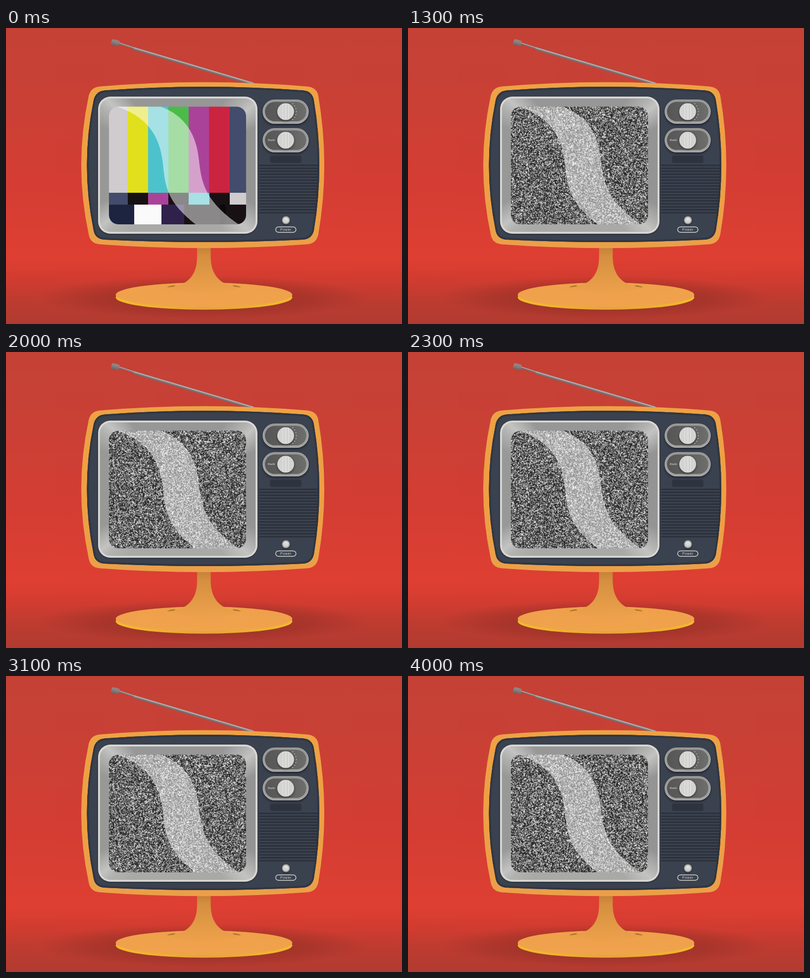
These frames come from a looping animation (800 by 600 pixels, 4.1 s). An HTML page with a canvas:

```html
<!DOCTYPE html>
<html lang="en">
<head>
<meta charset="utf-8">
<title>Retro television</title>
<style>
html, body { margin: 0; width: 100%; height: 100%; overflow: hidden; background: #c94035; }
canvas { display: block; width: 800px; height: 600px; }
</style>
</head>
<body>
<canvas id="stage" width="800" height="600"></canvas>
<script>
const LOOP = 4100, STATIC_START = 1000, STEP = 100;
const SCREEN = { x: 208, y: 159.5, w: 277, h: 238.5, r: 19 };

function layer(w, h) {
  const c = document.createElement('canvas');
  c.width = w;
  c.height = h;
  return c;
}

const stage = document.getElementById('stage').getContext('2d');
const backdrop = layer(800, 600);
const g = backdrop.getContext('2d');

function linear(x0, y0, x1, y1, ...stops) {
  const grad = g.createLinearGradient(x0, y0, x1, y1);
  stops.forEach(([at, color]) => grad.addColorStop(at, color));
  return grad;
}

function fill(path, color) {
  g.fillStyle = color;
  g.fill(path);
}

function stroke(path, color, width) {
  g.strokeStyle = color;
  g.lineWidth = width;
  g.stroke(path);
}

function rounded(x, y, w, h, r) {
  const p = new Path2D();
  p.roundRect(x, y, w, h, r);
  return p;
}

function oval(x, y, rx, ry = rx, turn = 0) {
  const p = new Path2D();
  p.ellipse(x, y, rx, ry, turn, 0, Math.PI * 2);
  return p;
}

function withShadow(color, blur, dy, draw) {
  g.save();
  g.shadowColor = color;
  g.shadowBlur = blur;
  g.shadowOffsetY = dy;
  draw();
  g.restore();
}

const shell = new Path2D(
  'M190 118.5 Q400 101 608 118.5 Q628 120 631 138 Q655 278 631 418 ' +
  'Q627 438 607 438.5 Q400 454 190 438.5 Q170 437 167 418 Q137 278 167 138 Q171 120 190 118.5Z');
const panel = new Path2D(
  'M200 126.5 Q400 111.5 600 126.5 Q619 128 622 147 Q644 278 622 410 ' +
  'Q618 428 599 429 Q400 439 200 429 Q180 428 177 410 Q150 278 177 147 Q181 128 200 126.5Z');
const gloss = new Path2D(
  'M222 159 C290 180 312 225 317 275 C322 330 330 355 383 398 ' +
  'L470 398 C400 350 395 310 390 270 C385 215 362 178 312 159Z');
const glass = rounded(SCREEN.x, SCREEN.y, SCREEN.w, SCREEN.h, SCREEN.r);

function drawRoom() {
  g.fillStyle = linear(0, 0, 0, 600, [0, '#c44136'], [0.25, '#ca4035'], [0.5, '#d33d33'],
    [0.78, '#de3f32'], [0.84, '#d33c30'], [0.93, '#bb3b30'], [1, '#b13b31']);
  g.fillRect(0, 0, 800, 600);

  g.save();
  g.translate(400, 546);
  g.scale(1, 0.13);
  const shade = g.createRadialGradient(0, 0, 120, 0, 0, 335);
  shade.addColorStop(0, 'rgba(110,36,28,.4)');
  shade.addColorStop(0.5, 'rgba(115,38,30,.25)');
  shade.addColorStop(1, 'rgba(120,40,32,0)');
  fill(oval(0, 0, 335), shade);
  g.restore();
}

function drawStand() {
  fill(oval(400, 546, 178.5, 25),
    linear(221, 0, 579, 0, [0, '#f3bb2d'], [0.3, '#ecb02f'], [0.5, '#e6a437'], [0.75, '#ecb02f'], [1, '#f3bb2d']));
  fill(oval(400, 541, 178.5, 25), linear(0, 516, 0, 566, [0, '#eea04a'], [1, '#f0a34c']));
  fill(oval(334, 524, 8, 1.6, -0.18), '#a76a30');
  fill(oval(466, 524, 8, 1.6, 0.18), '#a76a30');
  const neck = new Path2D(
    'M386 436 L386 464 C386 497 371 523 326 525.5 L400 546 L474 525.5 C429 523 414 497 413.5 464 L413.5 436Z');
  fill(neck, linear(0, 444, 0, 540, [0, '#c58137'], [0.2, '#d48f40'], [0.55, '#e09845'], [1, '#efa14b']));
}

function rod(x0, y0, x1, y1, width) {
  const line = new Path2D(`M${x0} ${y0} L${x1} ${y1}`);
  stroke(line, '#786c6c', width);
  g.save();
  g.translate(0, -width * 0.15);
  stroke(line, '#9a8f8f', width * 0.45);
  g.translate(0, -width * 0.17);
  stroke(line, '#c3bab9', width * 0.22);
  g.restore();
}

function drawAntenna() {
  rod(227, 30.5, 262, 42, 3.6);
  rod(258, 41.5, 500, 113.5, 6);
  g.save();
  g.translate(221, 30);
  g.rotate(0.25);
  fill(rounded(-8.5, -6, 16.5, 12, 3), linear(0, -6, 0, 6, [0, '#988888'], [0.5, '#8a7a7a'], [1, '#6e5f5f']));
  g.restore();
}

function drawCabinet() {
  fill(shell, linear(0, 110, 0, 447, [0, '#eda244'], [0.5, '#ee9f43'], [1, '#eb9f49']));
  fill(panel, '#3b424f');
  g.save();
  g.clip(panel);
  stroke(panel, 'rgba(28,33,43,.3)', 8);
  stroke(panel, '#2e343f', 3.5);
  g.restore();
}

function bevel() {
  const grad = g.createConicGradient(0, 347, 278);
  const sides = ['#949494', '#a9a9a8', '#989897', '#979797'];
  const corners = [0.113, 0.387, 0.613, 0.887];
  grad.addColorStop(0, sides[0]);
  corners.forEach((at, i) => {
    grad.addColorStop(at - 0.038, sides[i]);
    grad.addColorStop(at - 0.008, '#b2b2b1');
    grad.addColorStop(at + 0.006, '#c3c3c2');
    grad.addColorStop(at + 0.04, sides[(i + 1) % 4]);
  });
  grad.addColorStop(1, sides[0]);
  return grad;
}

function drawBezel() {
  withShadow('rgba(15,18,26,.5)', 4, 1, () => fill(rounded(186, 139, 322, 278, 25), '#d8d7d3'));
  fill(rounded(189.8, 142.8, 314.4, 270.4, 21), bevel());
}

function drawDial(y) {
  withShadow('rgba(15,18,26,.6)', 5, 3, () =>
    fill(rounded(518.5, y - 24.5, 93, 49, 24.5), linear(0, y - 25, 0, y + 25, [0, '#a0a09f'], [0.5, '#b0b0af'], [1, '#bbbbba'])));
  stroke(rounded(521, y - 22, 88, 44, 22), '#8e8e8d', 1.5);
  fill(rounded(523, y - 20, 84, 40, 20), linear(523, 0, 607, 0, [0, '#565656'], [0.5, '#5f5f5f'], [1, '#6e6e6d']));
  withShadow('rgba(20,20,20,.6)', 5, 2, () => fill(oval(565, y, 17), '#d4d4d2'));
  fill(rounded(556.5, y - 16.5, 17, 33, 5),
    linear(556, 0, 574, 0, [0, '#c8c8c6'], [0.18, '#dfdfdd'], [0.5, '#d8d8d6'], [0.85, '#dededc'], [1, '#c4c4c2']));
  g.fillStyle = '#c0c0be';
  g.fillRect(561, y - 15, 1, 30);
  g.fillRect(568, y - 15, 1, 30);
}

function drawControls() {
  drawDial(169.5);
  drawDial(227.5);
  for (let i = 0; i < 7; i++) {
    const a = -0.84 + i * 0.28;
    fill(oval(565 + 21.5 * Math.cos(a), 169.5 + 21.5 * Math.sin(a), 0.9), '#d8d8d6');
  }
  g.fillStyle = '#e6e6e4';
  g.textAlign = 'center';
  g.textBaseline = 'middle';
  g.font = 'italic 5.5px "Noto Serif", serif';
  g.fillText('Nuelo', 536, 227.5);

  withShadow('rgba(18,21,29,.5)', 3, 1, () => fill(rounded(534, 259, 62, 13, 2), '#2e343f'));

  g.save();
  g.clip(panel);
  g.fillStyle = '#2b303a';
  for (let y = 277; y < 374; y += 6) g.fillRect(511.5, y, 120, 2.8);
  g.restore();

  withShadow('rgba(15,18,26,.6)', 4, 2, () => fill(oval(565.5, 389.5, 8), '#a6a6a4'));
  fill(oval(565.5, 389.5, 5.8), linear(0, 383, 0, 396, [0, '#e6e6e4'], [1, '#cbcbc9']));
  stroke(rounded(544.8, 403.2, 41, 11, 5.5), '#d3d2ce', 1.5);
  g.fillStyle = '#dedcd8';
  g.font = '7px "Liberation Sans", Arial, sans-serif';
  g.letterSpacing = '0.6px';
  g.fillText('Power', 565.5, 409.2);
  g.letterSpacing = '0px';
}

// Each strip is [right edge, colour], laid from left to right.
function strips(ctx, y, h, list) {
  let x = SCREEN.x;
  for (const [right, color] of list) {
    ctx.fillStyle = color;
    ctx.fillRect(x, y, right - x, h);
    x = right;
  }
}

function drawBars(ctx) {
  const grey = '#cfcbce', yellow = '#e0e01c', cyan = '#4cc3cc', green = '#4bbb4a';
  const purple = '#ab4299', red = '#cb2440', blue = '#434c6c', black = '#171114';
  strips(ctx, 159, 175, [[246, grey], [287, yellow], [328, cyan], [369, green], [410, purple], [452, red], [485, blue]]);
  strips(ctx, 334, 24, [[246, blue], [287, black], [328, purple], [369, black], [411, cyan], [452, black], [485, grey]]);
  strips(ctx, 358, 41, [[259, '#1c2440'], [314, '#fbfafb'], [360, '#30214c'], [432, black], [444, '#0c090b'], [485, black]]);
}

function makeNoise(seed) {
  const c = layer(185, 160), ctx = c.getContext('2d');
  const img = ctx.createImageData(c.width, c.height);
  let s = seed;
  const random = () => (s = (s * 1664525 + 1013904223) >>> 0) / 4294967296;
  for (let i = 0; i < img.data.length; i += 4) {
    const v = random() < 0.56 ? 26 + 45 * random() : 125 + 125 * random();
    img.data[i] = img.data[i + 1] = img.data[i + 2] = v;
    img.data[i + 3] = 255;
  }
  ctx.putImageData(img, 0, 0);
  return c;
}

const noise = [11, 2203, 40507, 700001, 9000011].map(makeNoise);

function noiseAt(t) {
  let k = Math.floor((t - STATIC_START) / STEP);
  if (k > 15) k--; // one picture is held for two steps
  return noise[k % noise.length];
}

function draw(t) {
  stage.drawImage(backdrop, 0, 0);
  stage.save();
  stage.clip(glass);
  if (t < STATIC_START) {
    drawBars(stage);
  } else {
    stage.drawImage(noiseAt(t), 208, 159, 278, 240);
  }
  stage.fillStyle = 'rgba(255,255,255,.5)';
  stage.fill(gloss);
  stage.restore();
}

drawRoom();
drawStand();
drawAntenna();
drawCabinet();
drawBezel();
drawControls();

const start = performance.now();
function tick() {
  draw((performance.now() - start) % LOOP);
  requestAnimationFrame(tick);
}
tick();
</script>
</body>
</html>
```
